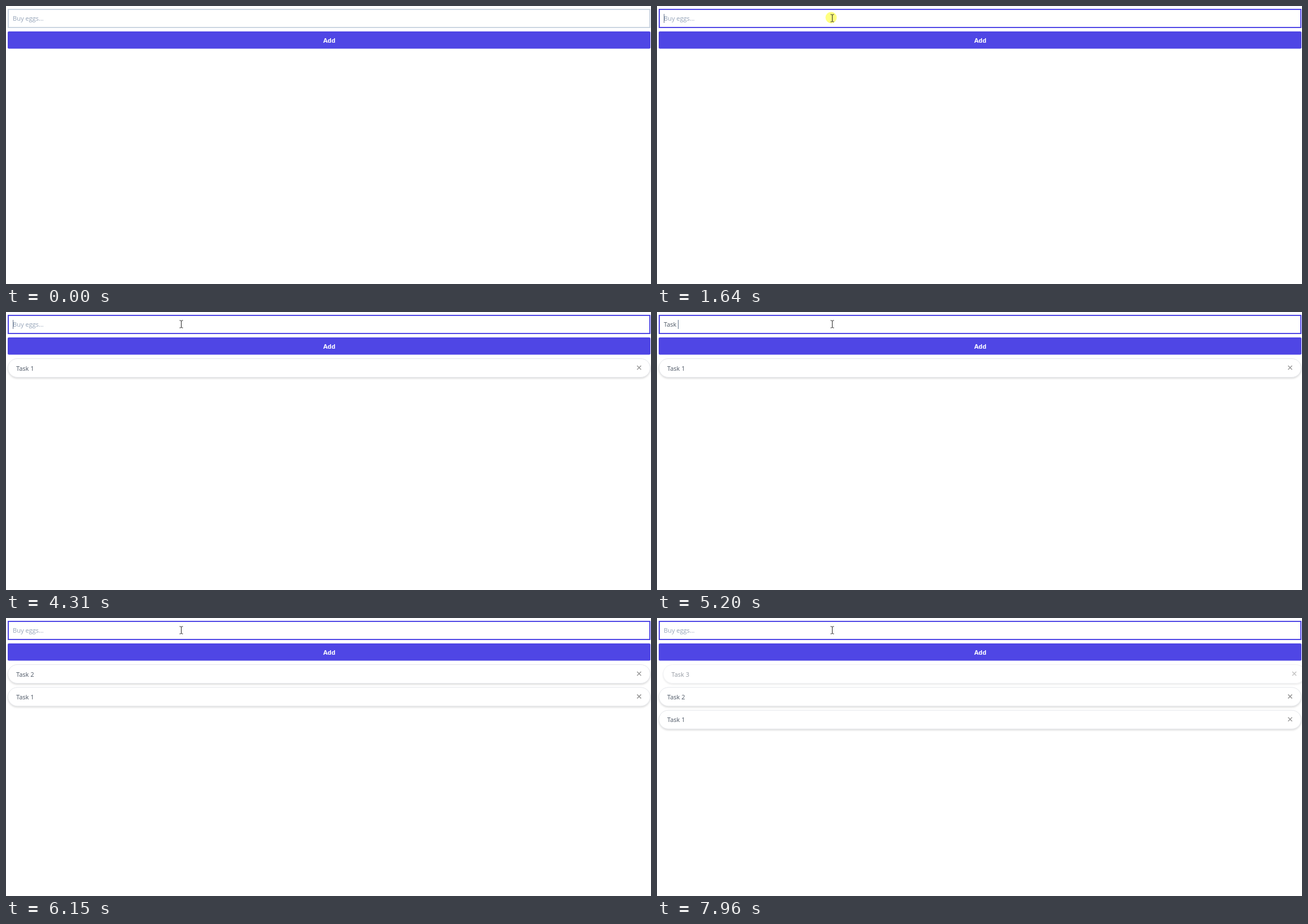
Write an HTML page that moves like this. It is 1139 by 492 pixels and loops after 8000 ms.

```html
<!DOCTYPE html>
<html lang="en">
<head>
<meta charset="utf-8">
<title>Task list</title>
<style>
  html, body { margin: 0; width: 100%; height: 100%; overflow: hidden; background: #fff; }
  svg { display: block; }
  text { font: 11px "Open Sans", "Noto Sans", sans-serif; fill: #4b5563; white-space: pre; }
  #hint { fill: #94a3b8; }
  #add { font-weight: 700; fill: #fff; text-anchor: middle; }
  .card rect { fill: #fff; stroke: #e5e7eb; filter: drop-shadow(0 2px 1.5px rgba(0, 0, 0, .13)); }
  .card path { stroke: #999; stroke-width: 1.5; }
</style>
</head>
<body>
<svg width="1139" height="492" viewBox="0 0 1139 492">
  <rect id="field" x="4" y="6" width="1133" height="32" fill="#fff" stroke-width="2"/>
  <text id="hint" x="12" y="26">Buy eggs...</text>
  <text id="typed" x="12" y="26"></text>
  <rect id="caret" y="14" width="1" height="16" fill="#64748b"/>
  <rect x="3" y="45" width="1135" height="30.5" rx="2" fill="#4f46e5"/>
  <text id="add" x="571" y="65">Add</text>
  <g id="cards"></g>
  <circle id="click" cx="307.5" cy="20.5" r="10" fill="#ffff80"/>
  <path id="arrow" d="M.5 .5V16.5L4.2 13L6.7 18.5L9 17.5L6.6 12.2H11.5Z" fill="#fff" stroke="#000"/>
  <path id="beam" d="M-3 -6.5H-1L0 -5.5L1 -6.5H3M0 -5.5V5.5M-3 6.5H-1L0 5.5L1 6.5H3" fill="none" stroke="#222"/>
</svg>
<script>
const LOOP = 8000, FOCUS = 1640, BLINK = 530, SLIDE = 550;
const tasks = [
  { text: "Task 1", keys: [2440, 2570, 2770, 2840, 3050, 3240], added: 3570 },
  { text: "Task 2", keys: [4510, 4710, 4910, 4980, 5200, 5330], added: 5600 },
  { text: "Task 3", keys: [6350, 6550, 6750, 6950, 7080, 7280], added: 7540 },
];
const $ = id => document.getElementById(id);
const show = (el, on) => el.setAttribute("visibility", on ? "visible" : "hidden");
const progress = (t, from, to) => Math.min(1, Math.max(0, (t - from) / (to - from)));

$("cards").innerHTML = tasks.map(({ text }) => `<g class="card">
  <rect x="3.5" y="82.5" width="1134" height="33" rx="16.5"/>
  <text x="18" y="103.5">${text}</text>
  <path d="M1114.5 95L1121.5 102M1121.5 95L1114.5 102"/>
</g>`).join("");
const cards = [...$("cards").children];

function pointerAt(t) {
  if (t < 670) {
    const rest = (1 - progress(t, 70, 340)) ** 2;
    return [467 + 361 * rest, 99 + 323 * rest];
  }
  // Curve up past the field, then settle inside it.
  const u = progress(t, 670, 1290), p = u * (2 - u), q = 1 - p;
  const bend = (a, b, c) => q * q * a + 2 * q * p * b + p * p * c;
  return [bend(467, 350, 310), bend(99, -20, 21)];
}

function drawPointer(t) {
  const [x, y] = pointerAt(t).map(Math.round);
  const inField = y > 4 && y < 39;
  show($("arrow"), t >= 70 && !inField);
  show($("beam"), t >= 70 && inField);
  $("arrow").setAttribute("transform", `translate(${x} ${y})`);
  $("beam").setAttribute("transform", `translate(${x - 0.5} ${y + 0.5})`);
  show($("click"), t >= FOCUS && t < FOCUS + 70);
}

function drawField(t) {
  const current = tasks.find(task => t < task.added);
  const typed = current ? current.text.slice(0, current.keys.filter(k => k <= t).length) : "";
  const lastKey = Math.max(FOCUS, ...tasks.flatMap(task => task.keys).filter(k => k <= t));
  $("field").setAttribute("stroke", t < FOCUS ? "#cbd5e1" : "#4f46e5");
  $("typed").textContent = typed;
  show($("hint"), !typed);
  show($("caret"), t >= FOCUS && (t - lastKey) % (2 * BLINK) < BLINK);
  $("caret").setAttribute("x", 12 + (typed ? Math.round($("typed").getComputedTextLength()) : 0));
}

function drawCards(t) {
  tasks.forEach(({ added }, i) => {
    const slot = tasks.filter(task => task.added > added && task.added <= t).length;
    const shown = progress(t, added, added + SLIDE) ** 2;
    cards[i].setAttribute("transform", `translate(${18 * (1 - shown)} ${40.4 * slot})`);
    cards[i].setAttribute("opacity", shown);
  });
}

function frame() {
  const t = performance.now() % LOOP;
  drawPointer(t);
  drawField(t);
  drawCards(t);
  requestAnimationFrame(frame);
}
frame();
</script>
</body>
</html>
```
